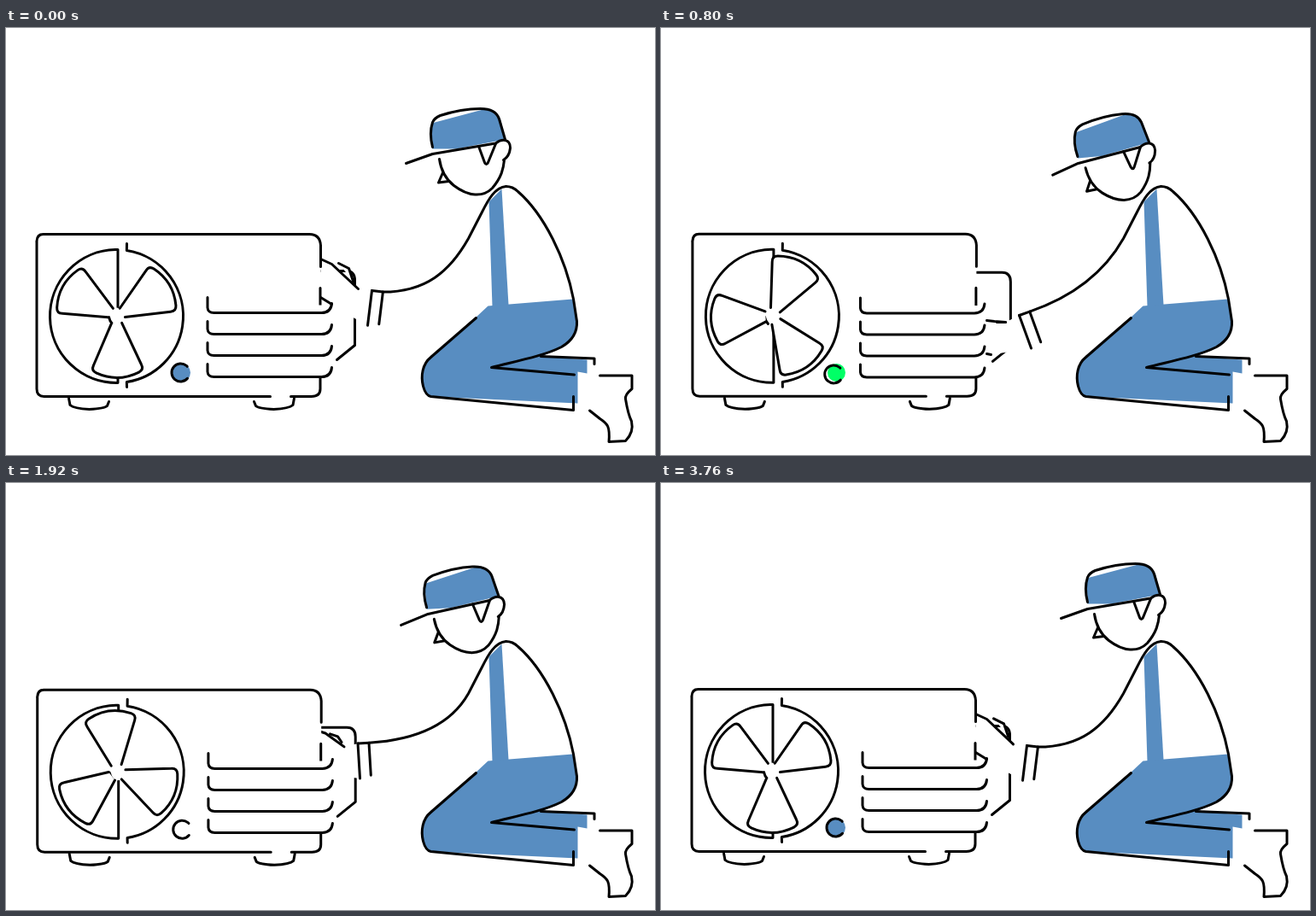
An HTML page with a canvas for the animation above (3.84 s loop, 760 px wide and 500 px high).

```html
<!DOCTYPE html>
<html lang="en">
<head>
<meta charset="utf-8">
<title>Repairing an air conditioner</title>
<style>
html, body { margin: 0; width: 100%; height: 100%; overflow: hidden; background: #fff; }
canvas { display: block; }
</style>
</head>
<body>
<canvas id="stage" width="760" height="500"></canvas>
<script>
const ctx = document.getElementById('stage').getContext('2d');
const LOOP = 3840, STEP = 80, TAU = Math.PI * 2;
const BLUE = [88, 141, 193], GREEN = [0, 255, 102];

// Key moments of the repair: wrist position, cuff tilt and fan rotation in degrees
const KEYS = [
  { t: 0,    x: 428, y: 307, tilt: 7,   spin: 0 },
  { t: 320,  x: 422, y: 343, tilt: -22, spin: 41 },
  { t: 800,  x: 419, y: 336, tilt: -20, spin: 207 },
  { t: 1200, x: 438, y: 295, tilt: 24,  spin: 364 },
  { t: 1600, x: 395, y: 302, tilt: -14, spin: 571 },
  { t: 2240, x: 428, y: 307, tilt: 7,   spin: 708 },
  { t: 2560, x: 428, y: 307, tilt: 7,   spin: 720 }
];

const clamp = x => Math.max(0, Math.min(1, x));
const smooth = x => (x = clamp(x), x * x * (3 - 2 * x));
const ramp = (t, from, to) => smooth((t - from) / (to - from));
const lerp = (a, b, u) => a + (b - a) * u;
const rgb = c => `rgb(${c.map(Math.round)})`;

function segment(t) {
  let i = 0;
  while (i < KEYS.length - 2 && t >= KEYS[i + 1].t) i++;
  return [i, clamp((t - KEYS[i].t) / (KEYS[i + 1].t - KEYS[i].t))];
}

function keyed(t, name) {
  const [i, u] = segment(t);
  return lerp(KEYS[i][name], KEYS[i + 1][name], smooth(u));
}

// Spins through the keys without stopping at them
function spinAt(t) {
  const [i, u] = segment(t);
  const slope = k => {
    const before = KEYS[k - 1], after = KEYS[k + 1];
    return before && after ? (after.spin - before.spin) / (after.t - before.t) : 0;
  };
  const span = KEYS[i + 1].t - KEYS[i].t;
  return keyed(t, 'spin') + span * u * (1 - u) * ((1 - u) * slope(i) - u * slope(i + 1));
}

const running = t => ramp(t, 0, 240) * (1 - ramp(t, 1900, 2240));
const wobble = (t, size, period, peak) => size * Math.cos(TAU * (t - peak) / period) * running(t);

const line = d => ctx.stroke(new Path2D(d));
const poly = (...points) => 'M' + points.join('L');

function fill(d, color = '#fff') {
  ctx.fillStyle = color;
  ctx.fill(new Path2D(d));
}

function shape(d) {
  fill(d);
  line(d);
}

function at(x, y, draw, angle = 0) {
  ctx.save();
  ctx.translate(x, y);
  ctx.rotate(angle);
  draw();
  ctx.restore();
}

function drawPipe() {
  line('M368,284H398Q408,284 408,295V371L387,388');
}

function drawArm(t) {
  const x = keyed(t, 'x'), y = keyed(t, 'y'), tilt = keyed(t, 'tilt');
  const angle = tilt * Math.PI / 180, s = Math.sin(angle), c = Math.cos(angle);
  const sleeve = (u, v) => [x + u * c - v * s, y + u * s + v * c];
  const wrist = [x, y], cuff = sleeve(0, 41), seam = sleeve(13, 0), seamEnd = sleeve(13, 38);

  // The hand stretches and rises as the cuff tilts forward
  const reach = Math.max(0, (tilt + 14) / 21), lift = Math.min(1, reach);
  const grip = 3.5 * (ramp(t, 1600, 2560) - ramp(t, 3600, 3800));
  const joint = (dx, dy, stretch, rise, press = 0) =>
    [x + dx - stretch * reach, y + dy - rise * lift + press];
  const back = [joint(-38, 6, 22, 43), joint(-29, 7, 18, 38), joint(-16, 8, 0, 10, grip)];
  const finger = [joint(-33, 46, 14, 30), joint(-38, 45, 22, 37)];
  const thumb = [joint(-26, 8, 13, 40, grip), joint(-20, 8, 7, 34, grip), joint(-16, 8, 6, 19)];

  fill(poly(...back, wrist, cuff, joint(-14, 43, 7, 11, grip), ...finger));
  fill(poly(wrist, seam, seamEnd, cuff));
  fill(poly(...thumb));
  line(poly(...back));
  line(poly(...finger));
  line(poly(...thumb));
  line(poly(wrist, cuff));
  line(poly(seam, seamEnd));

  const drape = [seam[0] + 50, seam[1] + 50 * Math.min(0, s)];
  line(`M585,185C572,186 564,201 557,215L541,246C519,285 ${drape} ${seam}L${wrist}`);
}

function drawCabinet(press) {
  const top = 241 + press;
  const foot = 'M73,433L74.5,441Q79,445 97,446Q115,445 118,442L120,437';
  fill(`M35,${top}H368V431H35Z`);
  line(`M368,279V${top + 13}Q367,${top} 355,${top}H43Q36,${top} 35.5,${top + 8}`);
  line('M35.5,250V422Q35.5,431 44,431H309M333,431H357Q367.5,431 367.5,422V409M367.5,304V333');
  line(foot);
  at(410, 0, () => {
    ctx.scale(-1, 1);
    line(foot);
  });
}

function drawFan(spin) {
  const radius = 78, edge = (x, side) => Math.atan2(side * radius, x);
  at(129, 337, () => {
    ctx.beginPath();
    ctx.arc(0, 0, radius, edge(1.5, 1), edge(1.5, -1) + TAU);
    ctx.closePath();
    ctx.stroke();
    ctx.beginPath();
    ctx.moveTo(12, -85);
    ctx.arc(0, 0, radius, edge(12, -1), edge(12, 1));
    ctx.lineTo(12, 83);
    ctx.stroke();

    ctx.fillStyle = '#fff';
    ctx.beginPath();
    ctx.arc(0, 0, 10, 0, TAU);
    ctx.fill();
    line('M-9,1Q-8,6 -5,9');

    ctx.rotate((spin - 1) * Math.PI / 180);
    for (let i = 0; i < 3; i++) {
      shape('M-6,8L-28,57Q-31,63 -25,66Q0,78 25,66Q31,63 28,57L6,8');
      ctx.rotate(TAU / 3);
    }
  });
}

function drawVents() {
  fill('M235,324H382V400L372,408H235Z');
  for (let i = 0; i < 4; i++) {
    const y = 333 + 25 * i, start = i ? 15 : 18;
    line(`M235.5,${y - start}V${y - 6}Q236,${y} 243,${y}H369Q380,${y} 381,${y - 11}`);
  }
}

function drawLight(t) {
  const dx = wobble(t, -2.6, 2500, 1000), dy = wobble(t, 2.3, 1280, 680);
  const lit = t < 1760 || Math.floor((t - 1760) / 560) % 2 === 1;
  if (lit) {
    const drag = clamp(-dy / 2), green = t < 1760 ? clamp((t - 80) / 330) : 0;
    ctx.fillStyle = rgb(BLUE.map((b, i) => lerp(b, GREEN[i], green)));
    ctx.beginPath();
    ctx.arc(205 + dx * drag, 403 + dy * drag, 10.5, 0, TAU);
    ctx.fill();
  }
  ctx.beginPath();
  ctx.arc(204 + dx, 403 + dy, 10.5, 0.7, TAU - 0.75);
  ctx.stroke();
}

function drawBody() {
  const blue = rgb(BLUE);
  fill('M565,203L580,188L588,324L569,326Z', blue);
  fill('M564,325L663,317L668,343Q669,362 650,373Q642,378 626,384L680,388V404L669,402V439' +
       'L497,431Q491,430 488,419C485,407 487,393 497,385L549,339Z', blue);
  line('M585,185Q593,185 599,191C630,218 655,270 664,317L668,343Q669,362 650,373C628,384 595,390 568,397L665,405.5');
  line('M550,339L497,385C487,393 485,407 488,419Q491,430 497,431L664,447V431');
  line('M626,384L688.5,386.5V393');
  line('M695,406.5H732.5V422Q724,429 725,434Q728,452 732,460Q735,473 725,483L705.5,484C707,466 704,463 695,457L683,447.5');
}

function drawHead() {
  fill('M498,111L558,95Q575,96 579,108L584,130L527,141H499Z', rgb(BLUE));
  line('M499,139C496,127 497,116 499,110Q501,105 508,102C525,96.5 540,94 555,94Q573,94 577,106L584,130');
  line('M507,153C509,167 515,177 524,184C541,197 558,198 569,187C580,174 582,164 583,154');
  line('M511,169L506,180.5L518,179');
  shape('M553,138L560,157Q562,161 564,157L573,135');
  line('M468,158L499,147L573,134.5C580,129 590,129 590,140Q589,150 582,154');
}

function drawScene(t) {
  ctx.fillStyle = '#fff';
  ctx.fillRect(0, 0, 760, 500);
  ctx.strokeStyle = '#000';
  ctx.lineWidth = 3;
  ctx.lineCap = ctx.lineJoin = 'round';

  const dx = wobble(t, -0.9, 1000, 320), dy = wobble(t, 1, 1760, 320);
  const press = 5 * clamp(1 - Math.abs(t - 320) / 200);
  const sag = 2 * (ramp(t, 320, 800) - ramp(t, 1600, 2240));
  const bow = ramp(t, 270, 810) - ramp(t, 1680, 2220);

  at(dx, dy + sag, drawPipe);
  drawArm(t);
  at(dx, dy, () => {
    drawCabinet(press);
    drawFan(spinAt(t));
  });
  at(wobble(t, 2.6, 1700, 1595), wobble(t, 1.1, 1250, 560), drawVents);
  drawLight(t);
  drawBody();
  at(617, 275, () => at(-617, -275, drawHead), -0.089 * bow);
}

function tick(now) {
  const t = Math.floor(now % LOOP / STEP) * STEP;
  at(0.5, 0.5, () => drawScene(t));
  requestAnimationFrame(tick);
}
requestAnimationFrame(tick);
</script>
</body>
</html>
```
